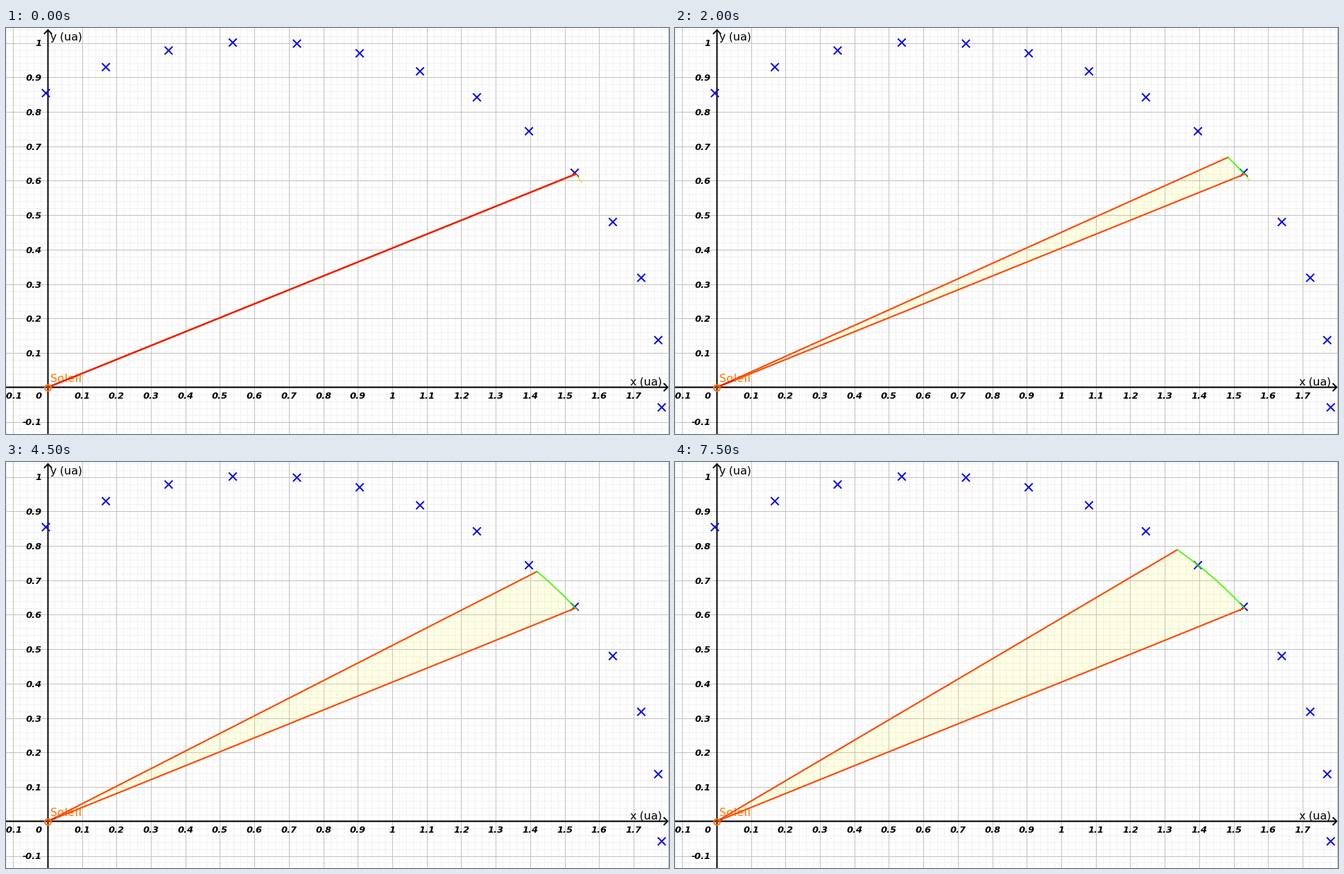
Animation, 956 px wide and 586 px high, one loop 8000 ms. Source, as a matplotlib script:

```python
import matplotlib.pyplot as plt
import numpy as np
from matplotlib.animation import FuncAnimation

# Whole-pixel letter advances
plt.rcParams["text.hinting_factor"] = 1

W, H, DPI = 956, 586, 64
PX = 72 / DPI            # points per pixel
OX, OY, UNIT = 59.83, 518.8, 497.2
AX, AY = 60.5, 518.5     # pixel centres of the axes
FRAMES, STEP = 16, 500

RAY, OVERLAP, TRAIL, OLD, SUN = "#ff4a05", "#f02000", "#3cf500", "#ffd746", "#ff7800"

fig = plt.figure(figsize=(W / DPI, H / DPI), dpi=DPI, facecolor="white")
ax = fig.add_axes([0, 0, 1, 1])
ax.set_xlim(0, W)
ax.set_ylim(H, 0)
ax.axis("off")


def line(xs, ys, color, width, z, **kw):
    return ax.plot(xs, ys, color=color, lw=width * PX, zorder=z, **kw)[0]


def label(x, y, text, size, ha="left", color="black", **kw):
    ax.text(x, y, text, fontsize=size * PX, ha=ha, va="baseline", color=color,
            zorder=4, fontname="DejaVu Sans", **kw)


def grid(step, color, z):
    d = step * UNIT
    for k in range(-60, 100):
        x, y = OX + k * d, OY - k * d
        if 0 <= x <= W:
            line([x, x], [0, H], color, 1, z)
        if 0 <= y <= H:
            line([0, W], [y, y], color, 1, z)


def tick(x, y, k, ha):
    label(x, y, f"{k / 10:g}", 13, ha, weight="bold", style="oblique")


def path(t):
    """Position of the planet after t steps."""
    return 821 - 5.7 * t - 0.05 * t**2, 211 - 6.25 * t + 0.042 * t**2


grid(0.02, "#f0f0f0", 0)
grid(0.1, "#c0c0c0", 1)

# Axes with open arrow heads
line([AX, AX], [3, H], "black", 2, 3, snap=False)
line([0, W - 2], [AY, AY], "black", 2, 3, snap=False)
line([AX - 5, AX, AX + 5], [8, 3, 8], "black", 2, 3)
line([W - 7, W - 2, W - 7], [AY - 5, AY, AY + 5], "black", 2, 3)

for k in range(-1, 18):
    if k:
        tick(OX + k * UNIT / 10, 535, k, "center")
        if k <= 10:
            tick(51.5, OY - k * UNIT / 10 + 4.9, k, "right")
tick(47, 535, 0, "center")
label(64.5, 18, "y (ua)", 16)
label(900.5, 515, "x (ua)", 16)
label(64, 511, "Soleil", 16, color=SUN)

marks = [(57.5, 94), (144, 56.5), (234.5, 32.5), (327, 21), (419.5, 22.5),
         (510, 36.5), (597, 62.5), (679, 100), (754, 149), (820, 209),
         (875, 280), (916, 360.5), (940.5, 450.5), (945.5, 547.5)]
for x, y in marks:
    for s in (-5, 5):
        line([x - 5, x + 5], [y - s, y + s], "#0000f0", 2, 4)

area = ax.fill([0], [0], color="#ffff00", alpha=0.1, lw=0, zorder=5)[0]
old = line([], [], OLD, 2, 6)
trail = line([], [], TRAIL, 2, 8, alpha=0.85)
x0, y0 = path(0)
line([AX, x0], [AY, y0], RAY, 2.2, 7)
ray = line([], [], RAY, 2.2, 7)
overlap = line([], [], OVERLAP, 2.2, 7.5)
ax.plot(AX, AY, "o", ms=9 * PX, mfc="none", mec=SUN, mew=2 * PX, zorder=9)


def draw(i):
    x, y = path(np.linspace(0, i, 40))
    area.set_xy(np.column_stack([np.r_[AX, x], np.r_[AY, y]]))
    trail.set_data(x, y)
    trail.set_visible(i > 0)
    ray.set_data([AX, x[-1]], [AY, y[-1]])

    # The two rays merge where they are less than a pixel apart
    f = min(1, 1 / (8 * i)) if i else 1
    overlap.set_data([AX, AX + f * (x0 - AX)], [AY, AY + f * (y0 - AY)])

    left = max(0, 1 - i / 14)
    old.set_data([x0, x0 + 9 * left], [y0, y0 + 11 * left])
    old.set_visible(left > 0)
    return area, trail, ray, overlap, old


anim = FuncAnimation(fig, draw, frames=FRAMES, interval=STEP,
                     repeat=True, repeat_delay=0, blit=False)
plt.show()
```
